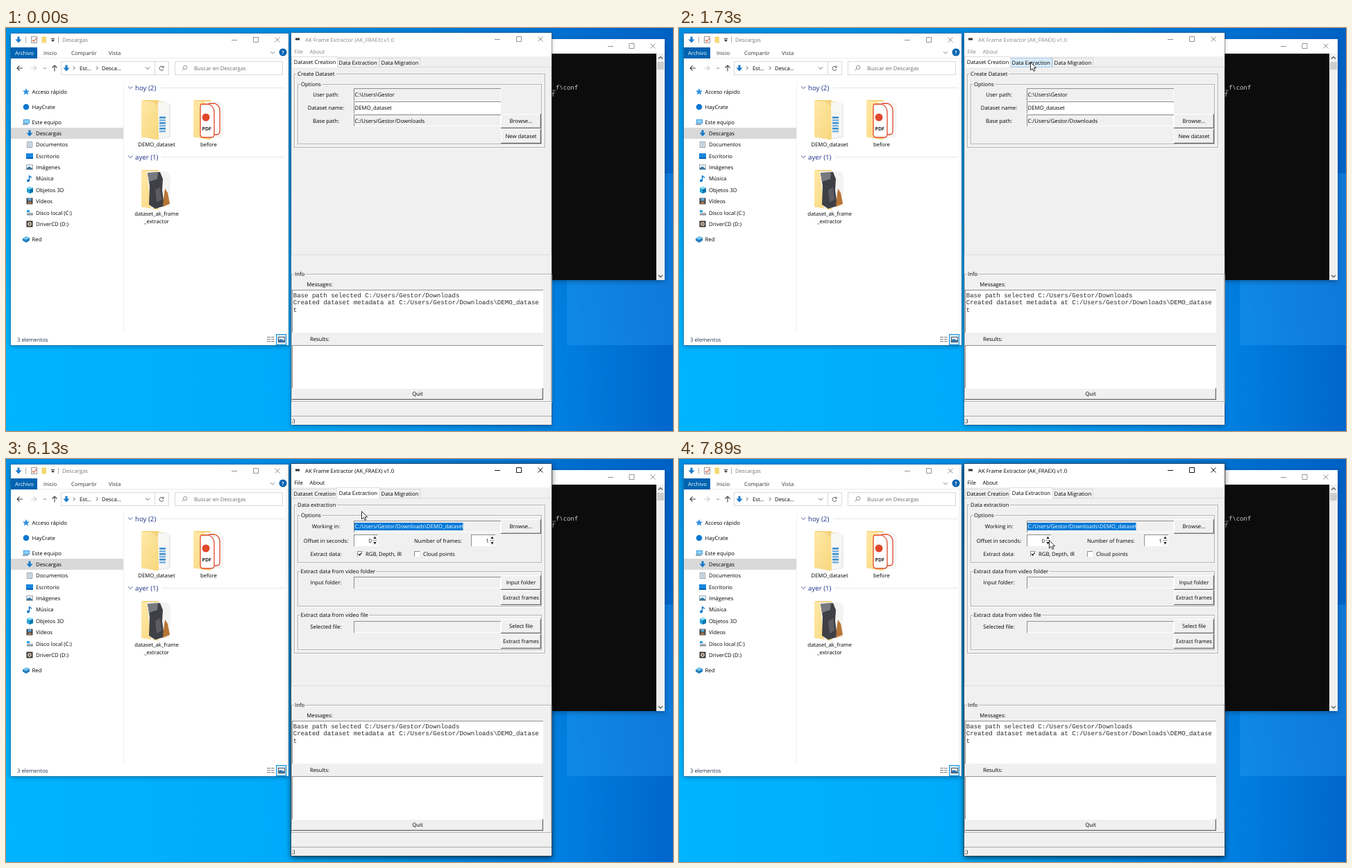
These frames come from a looping animation (961x582 px, 8000 ms). An HTML page:

```html
<!DOCTYPE html>
<html lang="es">
<head>
<meta charset="utf-8">
<title>Frame extractor desktop</title>
<style>
html, body { margin: 0; width: 100%; height: 100%; overflow: hidden; background: #0090ea; }
svg { display: block; width: 961px; height: 582px; }
text { font: 7.75px "Open Sans", "Noto Sans", sans-serif; text-rendering: geometricPrecision; fill: currentColor; white-space: pre; }
.mid { text-anchor: middle; }
.end { text-anchor: end; }
.head { font-size: 9.7px; fill: #1e3287; }
.label { paint-order: stroke; stroke: #f0f0f0; stroke-width: 4px; }
.mono { font: 9.09px "Liberation Mono", "Courier New", monospace; fill: #2a2a2a; }
.con { font: 8.9px "Noto Sans Mono", monospace; fill: #ccc; }
.bold { font-weight: 700; font-size: 7px; }
.soft { filter: drop-shadow(0 2px 3px rgba(0,0,0,.3)); }
.deep { filter: drop-shadow(0 3px 5px rgba(0,0,0,.45)); }

.first, .second, .late, .ring, .active, .hover, .cursor, .arrow, .beam, .tint {
  animation: 8s step-end infinite;
}
.first { animation-name: first; }
.second, .active { animation-name: second; }
.late { animation-name: late; }
.ring { animation-name: ring; mix-blend-mode: multiply; }
.hover { animation-name: hover; }
.tint { animation-name: tint; }
.cursor { animation-name: move; }
.arrow { animation-name: arrow; }
.beam { animation-name: beam; }

@keyframes first { 0% { opacity: 1 } 60%, 100% { opacity: 0 } }
@keyframes second { 0% { opacity: 0 } 60%, 100% { opacity: 1 } }
@keyframes late { 0% { opacity: 0 } 60.875%, 100% { opacity: 1 } }
@keyframes ring { 0% { opacity: 0 } 60% { opacity: .75 } 62.5%, 100% { opacity: 0 } }
@keyframes hover { 0% { opacity: 0 } 20.75% { opacity: .5 } 21.625% { opacity: 1 } 60%, 100% { opacity: 0 } }
@keyframes tint { 0% { color: #858585 } 60%, 100% { color: #000 } }
@keyframes arrow {
  0% { opacity: 1 } 14% { opacity: 0 } 15.75% { opacity: 1 }
  77.5% { opacity: 0 } 78.375% { opacity: 1 } 79.25% { opacity: 0 } 80.25%, 100% { opacity: 1 }
}
@keyframes beam {
  0% { opacity: 0 } 14% { opacity: 1 } 15.75% { opacity: 0 }
  77.5% { opacity: 1 } 78.375% { opacity: 0 } 79.25% { opacity: 1 } 80.25%, 100% { opacity: 0 }
}
@keyframes move {
  0% { transform: translate(-40px, -40px) }
  9.75% { transform: translate(886px, 532px) }
  10.625% { transform: translate(846px, 470px) }
  11.5% { transform: translate(778px, 362px) }
  12.375% { transform: translate(690px, 250px) }
  13.125% { transform: translate(615px, 172px) }
  14% { transform: translate(562px, 119px) }
  14.875% { transform: translate(535px, 96px) }
  15.75% { transform: translate(522px, 82px) }
  16.625% { transform: translate(513px, 71px) }
  17.375% { transform: translate(508px, 63px) }
  18.25% { transform: translate(506px, 58px) }
  20.75% { transform: translate(506px, 52px) }
  21.625% { transform: translate(506px, 49px) }
  76.625% { transform: translate(512px, 75px) }
  77.5% { transform: translate(514px, 92px) }
  78.375% { transform: translate(516px, 107px) }
  79.25% { transform: translate(517px, 116px) }
  80.25% { transform: translate(518px, 123px) }
  81.125% { transform: translate(519px, 126px) }
  82% { transform: translate(519px, 128px) }
  85.875% { transform: translate(522px, 126px) }
  86.75% { transform: translate(526px, 122px) }
  87.75% { transform: translate(530px, 119px) }
  89.375% { transform: translate(536px, 119px) }
  90.25% { transform: translate(540px, 119px) }
  92.75% { transform: translate(538px, 119px) }
  93.625% { transform: translate(537px, 119px) }
  94.5% { transform: translate(535px, 118px) }
  95.375% { transform: translate(534px, 118px) }
  98.625%, 100% { transform: translate(533px, 117px) }
}
</style>
</head>
<body>
<svg id="stage" viewBox="0 0 961 582">
  <defs>
    <linearGradient id="sky">
      <stop offset="0" stop-color="#00b4ff"/><stop offset=".42" stop-color="#00aafb"/>
      <stop offset=".8" stop-color="#0084e4"/><stop offset="1" stop-color="#0066cc"/>
    </linearGradient>
    <linearGradient id="dusk" x2="0" y2="1">
      <stop offset="0" stop-color="#0058b8" stop-opacity=".4"/><stop offset=".8" stop-color="#0058b8" stop-opacity="0"/>
    </linearGradient>
    <linearGradient id="flap" x2="1" y2="1">
      <stop offset="0" stop-color="#ffe9a8"/><stop offset="1" stop-color="#f7d67c"/>
    </linearGradient>
  </defs>
</svg>
<script>
const rect = (x, y, w, h, fill, more = '') =>
  `<rect x="${x}" y="${y}" width="${w}" height="${h}" fill="${fill}" ${more}/>`;
const box = (x, y, w, h, line, fill = 'none') =>
  rect(x + .5, y + .5, w - 1, h - 1, fill, `stroke="${line}"`);
const path = (d, line, width = 1, fill = 'none') =>
  `<path d="${d}" fill="${fill}" stroke="${line}" stroke-width="${width}"/>`;
const poly = (points, fill) => `<polygon points="${points}" fill="${fill}"/>`;
const dot = (x, y, r, fill) => `<circle cx="${x}" cy="${y}" r="${r}" fill="${fill}"/>`;
// y is the middle of the capital letters
const text = (x, y, s, cls = '', color = '') =>
  `<text x="${x}" y="${y + 2.8}" class="${cls}"${color && ` style="fill:${color}"`}>${s}</text>`;
const group = (cls, ...parts) => `<g class="${cls}">${parts.join('')}</g>`;
const at = (x, y, s) => `<g transform="translate(${x} ${y})">${s}</g>`;

const controls = (x, y, gap, color) =>
  path(`M${x - 4} ${y + .5}h8M${x + gap - 3.5} ${y - 3.5}h7v7h-7z` +
    `M${x + 2 * gap - 3.5} ${y - 3.5}l7 7m0-7l-7 7`, color, .9);

const button = (x, y, w, h, s) =>
  rect(x, y, w, h, '#696969') + rect(x, y, w - 1, h - 1, '#fff') +
  rect(x + 1, y + 1, w - 2, h - 2, '#b4b4b4') + rect(x + 1, y + 1, w - 2.6, h - 2.6, '#f0f0f0') +
  text(x + w / 2, y + h / 2, s, 'mid');

const field = (x, y, w, h, fill = '#f0f0f0') =>
  rect(x, y, w, h, '#909090') + rect(x + 1, y + 1, w - 1, h - 1, '#fff') +
  rect(x + 1, y + 1, w - 2, h - 2, fill);

const frame = (x, y, w, h, s, lx) =>
  box(x + .8, y + .8, w, h, '#fff') + box(x, y, w, h, '#b2b2b2') + text(lx, y, s, 'label');

const spin = (x, y, n) =>
  field(x, y, 35, 17, '#fff') + text(x + 26, y + 8.8, n, 'end') +
  rect(x + 27, y + 1, 7, 15, '#f0f0f0') + path(`M${x + 27} ${y + 8.5}h7`, '#999', .8) +
  poly(`${x + 28.5},${y + 6} ${x + 32.5},${y + 6} ${x + 30.5},${y + 3}`, '#000') +
  poly(`${x + 28.5},${y + 11} ${x + 32.5},${y + 11} ${x + 30.5},${y + 14}`, '#000');

const check = (x, y, on) =>
  field(x, y, 8, 8, '#fff') + (on ? path(`M${x + 2} ${y + 4}l1.7 2 3-4`, '#000', 1.2) : '');

const downArrow = path('M0-4.5V0', '#1979ca', 3) + poly('-4.5,-.5 4.5,-.5 0,4.5', '#1979ca');
const chevron = (x, y, color = '#666') => path(`M${x - 3} ${y - 1.5}l3 3 3-3`, color);

function desktop() {
  return rect(0, 0, 961, 582, 'url(#sky)') + rect(0, 0, 961, 582, 'url(#dusk)') +
    rect(808, 210, 153, 248, '#2b9df2', 'opacity=".35"');
}

function terminal() {
  return rect(500, 16, 449, 348, '#0c0c0c', 'class="soft"') + rect(500, 16, 449, 21, '#fff') +
    controls(871, 26, 30.5, '#888') + rect(937, 37, 12, 327, '#f0f0f0') +
    rect(938, 49, 10, 11, '#cdcdcd') +
    path('M940 44.5l3-3 3 3M940 357l3 3 3-3', '#505050', 1.2) +
    text(786.7, 86.5, '_f\\conf', 'con') + text(785.5, 96.5, 'f', 'con');
}

const sideIcons = {
  star: poly('0,-5 1.5,-1.6 5,-1.4 2.3,1 3.3,4.6 0,2.6 -3.3,4.6 -2.3,1 -5,-1.4 -1.5,-1.6', '#2f8fdd'),
  mark: dot(0, 0, 4.3, '#0a78d0'),
  pc: rect(-4, -4, 9, 6, '#3a9be0') + rect(-3, -3, 7, 4, '#8fd3f7') + rect(-5, 2.5, 8, 1.5, '#7d8c99'),
  down: downArrow,
  doc: box(-4, -4.5, 8, 9, '#8797a5', '#fff') + path('M-2-2h4M-2 0h4M-2 2h4', '#5b88ac', .8),
  desk: rect(-5, -4, 10, 8, '#1687df') + rect(-5, 2, 10, 2, '#0961b5'),
  pic: box(-5, -4, 10, 8, '#a3acb3', '#e7f4fd') + poly('-4,3 -4,1 0,-1 4,2 4,3', '#39769f'),
  note: path('M-.5 3v-7.5q1 2 3.5 3', '#0878cf', 1.4) + dot(-2, 3, 2, '#0878cf'),
  cube: poly('0,-5 5,-3 5,3 0,5 -4,3 -4,-3', '#27a1d5') + poly('0,-1 5,-3 5,3 0,5', '#0876ad') + poly('0,-5 5,-3 0,-1 -4,-3', '#8de0f4'),
  film: rect(-4.5, -4.5, 9, 9, '#444') + rect(-2.5, -4, 5, 3.5, '#5ca9df') + rect(-2.5, .5, 5, 3.5, '#9a7253'),
  disk: rect(-4, 0, 9, 3.5, '#8d969c') + rect(-4, -1, 9, 2, '#d0d4d7') + rect(-4, -4, 4, 3, '#29a2e5'),
  cd: rect(-4.5, -4.5, 9, 9, '#3b3733') + dot(0, 0, 3, '#c6b9a7') + dot(0, 0, 1, '#333'),
  net: poly('-5,-1 0,-4 5,-2 5,2 0,5 -5,2', '#267fbd') + poly('-5,-1 0,-4 5,-2 0,1', '#76c6ef')
};

const sideRows = [
  [0, 92, 'star', 'Acceso rápido'], [0, 114, 'mark', 'HayCrate'], [0, 136, 'pc', 'Este equipo'],
  [1, 152, 'down', 'Descargas'], [1, 168.5, 'doc', 'Documentos'], [1, 185, 'desk', 'Escritorio'],
  [1, 201, 'pic', 'Imágenes'], [1, 217.5, 'note', 'Música'], [1, 234, 'cube', 'Objetos 3D'],
  [1, 250, 'film', 'Vídeos'], [1, 267, 'disk', 'Disco local (C:)'], [1, 283, 'cd', 'DriverCD (D:)'],
  [0, 305, 'net', 'Red']
];

const folder = (x, y, behind, front = '') => at(x, y,
  poly('1,1 24,1 26,3 34,3 34,55 1,55', '#f3d27c') + behind +
  poly('0,2 15,3 24,10 25,58 20,58 0,54', 'url(#flap)') + front);

const sheets = poly('24,4 37,3 41,7 41,54 24,56', '#f6f6f4') + path('M41 7v47l-16 3', '#d6d6d6', .8) +
  [0, 1, 2, 3, 4, 5].map(i => rect(26, 25 + i * 4, 9, 2.6, i % 2 ? '#7bb4df' : '#3d8ecb')).join('');

const paper = poly('12,3 38,3 44,8 43,55 12,57', '#f6f6f4') +
  path('M22 6h9q7 3 7 10v30q0 5-5 5h-9', '#e0472b', 1.3, '#fff');

const pdf = path('M12 7h10q8 3 8 12v31q0 5-4 5h-12q-4 0-4-5v-38q0-5 2-5z', '#e0472b', 1.3, '#fff') +
  dot(18, 26, 5.5, '#e0472b') + text(12.5, 42, 'PDF', 'bold', '#222');

const photo = poly('8,3 37,3 42,8 41,54 14,57', '#f3f3f1') +
  poly('9,5 27,4 31,14 30,30 33,53 20,57 11,51 12,24', '#3f4046') +
  poly('9,5 24,5 23,14 11,18', '#77797e') + poly('20,30 27,26 29,44 22,48', '#5c5c62') +
  poly('34,28 38,34 41,50 31,54 32,43', '#b87535');

function explorer() {
  const side = sideRows.map(([deep, y, icon, s]) =>
    at(deep ? 34 : 29, y, sideIcons[icon]) + text(deep ? 43 : 37.5, y, s)).join('');
  const section = (y, s, x) => path(`M176 ${y - 1.5}l3.2 3 3.2-3`, '#4a5a96') +
    text(186, y + .7, s, 'head') + rect(x, y, 402 - x, 1, '#e6e6e6');
  return rect(7, 8, 400, 450, '#fff', 'class="soft"') + box(6, 7, 402, 452, 'rgba(60,90,130,.35)') +
    at(18, 17, downArrow) + rect(28, 12.5, 1, 9, '#aaa') +
    box(36, 12, 9, 10, '#999', '#fff') + path('M38 17l2 2.5 4-5', '#d8542f', 1.2) +
    poly('51.5,13 55,12 58,13 58,22 51.5,21', '#f7d774') +
    rect(65, 15, 5, 1, '#333') + poly('65,17 70,17 67.5,20', '#333') + rect(75, 12.5, 1, 9, '#aaa') +
    text(81, 17.5, 'Descargas', '', '#777') + controls(329, 17, 31, '#888') +
    rect(7, 28, 38, 16, '#0063b1') + text(13, 36, 'Archivo', '', '#fff') +
    text(54, 36, 'Inicio', '', '#333') + text(94, 36, 'Compartir', '', '#333') + text(148, 36, 'Vista', '', '#333') +
    chevron(384, 35.5, '#888') + dot(399, 35, 5.5, '#0063b1') + text(399, 35, '?', 'mid bold', '#fff') +
    rect(45, 43, 362, 1, '#ececec') +
    path('M24 58h-8m3.5-3.5l-3.5 3.5 3.5 3.5', '#444', 1.1) +
    path('M36 58h8m-3.5-3.5l3.5 3.5-3.5 3.5', '#ccc', 1.1) +
    path('M54 57l2 2 2-2', '#888') + path('M70 62.5v-8.5m-3.5 3.5l3.5-3.5 3.5 3.5', '#444', 1.1) +
    box(79, 48, 156, 20, '#d9d9d9') + rect(214, 48, 1, 20, '#d9d9d9') + at(87, 58, downArrow) +
    path('M97 55.5l2.3 2.3-2.3 2.3M130 55.5l2.3 2.3-2.3 2.3', '#555') +
    text(106, 58, 'Est...') + text(138, 58, 'Desca...') + chevron(204, 58) +
    path('M226.5 56.5a3 3 0 1 0 .5 2.5M227 54.5v2.5h-2.5', '#555') +
    box(243, 48, 156, 20, '#d9d9d9') +
    path('M256 58.5l-2.5 3M255.5 57a2.7 2.7 0 1 1 5.4 0a2.7 2.7 0 1 1-5.4 0', '#888', .9) +
    text(271, 58, 'Buscar en Descargas', '', '#6d6d6d') +
    rect(169, 78, 1, 362, '#f0f0f0') + rect(7, 144, 162, 16, '#d9d9d9') + side +
    section(86, 'hoy (2)', 222) + section(186, 'ayer (1)', 224) +
    folder(195, 103, sheets) + folder(270, 103, paper, pdf) + folder(195, 204, '', photo) +
    text(217, 168.5, 'DEMO_dataset', 'mid') + text(292, 168.5, 'before', 'mid') +
    text(217, 268.5, 'dataset_ak_frame', 'mid') + text(217, 279, '_extractor', 'mid') +
    text(16, 450, '3 elementos', '', '#1e3250') +
    path('M376 446.5h5M376 449.5h5M376 452.5h5M382 446.5h4.5M382 449.5h4.5M382 452.5h4.5', '#777', 1) +
    box(389, 442, 15, 16, '#0f8fd6', '#cce8ff') + box(392, 446, 10, 8, '#555', '#fff') +
    poly('393,453 393,450 396,449 401,451 401,453', '#337ab7');
}

const tab = (x, w, s, on) => on
  ? box(x - 1, 41, w + 2, 16, '#dcdcdc', '#fff') + rect(x, 56, w, 1, '#fff') + text(x + 2.8, 49, s)
  : box(x, 43, w, 14, '#d9d9d9', '#f0f0f0') + text(x + 2.5, 50, s);

function creationTab() {
  return tab(477, 61, 'Data Extraction') +
    group('hover', box(477, 43, 61, 14, '#a9cbe8', '#d9ebf9'), text(479.5, 50, 'Data Extraction')) +
    tab(412, 65, 'Dataset Creation', true) +
    frame(415, 66, 362, 107, 'Create Dataset', 420) + frame(420, 81, 352, 87, 'Options', 425) +
    text(461, 96, 'User path:', 'mid') + text(461, 115, 'Dataset name:', 'mid') + text(461, 134, 'Base path:', 'mid') +
    field(501, 87, 212, 18) + text(502.5, 96, 'C:\\Users\\Gestor') +
    field(501, 106, 212, 17, '#fff') + text(502.5, 115, 'DEMO_dataset') +
    field(501, 125, 212, 17) + text(502.5, 134, 'C:/Users/Gestor/Downloads') +
    button(713, 124, 58, 21, 'Browse...') + button(713, 146, 58, 21, 'New dataset');
}

function extractionTab() {
  return tab(412, 65, 'Dataset Creation') + tab(477, 61, 'Data Extraction', true) +
    frame(415, 66, 362, 215, 'Data extraction', 420) + frame(420, 81, 352, 69, 'Options', 425) +
    text(461, 97.5, 'Working in:', 'mid') + field(501, 89, 212, 17) + rect(502, 92, 156.5, 11, '#0078d7') +
    text(502.5, 97.5, 'C:/Users/Gestor/Downloads\\DEMO_dataset', '', '#fff') + button(713, 87, 58, 21, 'Browse...') +
    text(461, 118, 'Offset in seconds:', 'mid') + text(588, 118, 'Number of frames:') +
    text(461, 137.5, 'Extract data:', 'mid') + check(506, 133, true) + text(518, 137.5, 'RGB, Depth, IR') +
    check(588, 133, false) + text(601, 137.5, 'Cloud points') +
    frame(420, 162, 352, 51, 'Extract data from video folder', 424.5) + text(461, 178.5, 'Input folder:', 'mid') +
    button(713, 168, 58, 21, 'Input folder') + button(713, 190, 58, 21, 'Extract frames') +
    frame(420, 225, 352, 51, 'Extract data from video file', 424.5) + text(461, 242, 'Selected file:', 'mid') +
    button(713, 231, 58, 21, 'Select file') + button(713, 253, 58, 21, 'Extract frames') +
    group('late', spin(501, 109, '0'), spin(670, 109, '1'), field(501, 170, 212, 17), field(501, 234, 212, 17));
}

function extractor() {
  return rect(411, 7, 375, 566, '#f0f0f0', 'class="soft"') +
    group('active', rect(411, 7, 375, 566, '#f0f0f0', 'class="deep"')) +
    rect(411, 7, 375, 34, '#fff') + rect(417, 14.5, 6, 3, '#333') +
    group('tint', text(431, 17, 'AK Frame Extractor (AK_FRAEX) v1.0'), text(415.5, 34, 'File'),
      text(437.5, 34, 'About'), controls(708, 16, 31, 'currentColor')) +
    box(411, 56, 375, 272, '#dcdcdc') + tab(538, 59, 'Data Migration') +
    group('first', creationTab()) + group('second', extractionTab()) +
    frame(411, 355, 375, 185, 'Info', 416) +
    text(452, 370, 'Messages:', 'mid') + field(412, 378, 362, 62, '#fff') +
    ['Base path selected C:/Users/Gestor/Downloads',
      'Created dataset metadata at C:/Users/Gestor/Downloads\\DEMO_datase', 't']
      .map((s, i) => text(413.7, 385.7 + i * 10.9, s, 'mono')).join('') +
    text(452, 449.5, 'Results:', 'mid') + field(412, 458, 362, 62, '#fff') +
    button(412, 520, 362, 17, 'Quit') +
    rect(411, 560, 375, 1, '#a8a8a8') + text(412, 567, ';)') +
    box(410, 6, 377, 568, 'rgba(60,80,100,.45)') +
    group('active', box(410, 6, 377, 568, 'rgba(40,50,60,.5)'));
}

const pointer = '<circle class="ring" cx="508.5" cy="49.5" r="11" fill="#fbdc2c"/>' + group('cursor',
  group('arrow', path('M.5.6V11.9L3.2 9.4 5 13.3 6.8 12.5 5.1 8.8H8.6Z', '#000', .8, '#fff')),
  group('beam', path('M-2-5h1.5l.5.5.5-.5H2M0-4.5v9.5M-2 5.5h1.5l.5-.5.5.5H2', '#000', 1)));

document.getElementById('stage').innerHTML += desktop() + terminal() + explorer() + extractor() + pointer;
</script>
</body>
</html>
```
